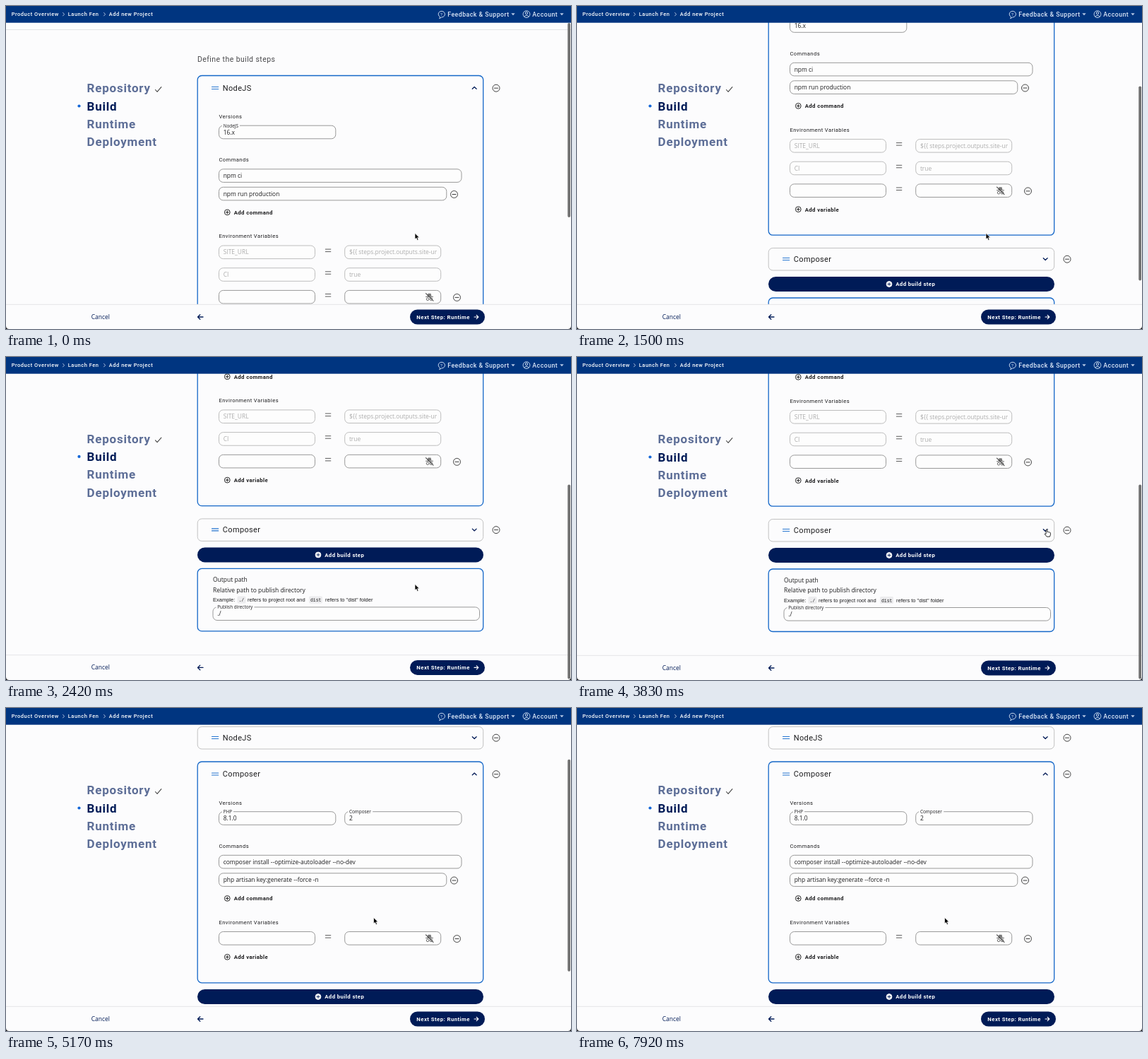
These frames come from a looping animation (800 px wide and 457 px high, 8 s). An HTML page:

```html
<!DOCTYPE html>
<html lang="en">
<head>
<meta charset="utf-8">
<title>Build steps</title>
<style>
  html, body { margin: 0; height: 100%; overflow: hidden; background: #fcfcfd; }
  svg { display: block; width: 100vw; height: 100vh; }
  text { white-space: pre; fill: #1d1d1f; }
  .ui { font-family: Roboto, sans-serif; }
  .in { font-family: "Open Sans", "Noto Sans", sans-serif; }
  .arial { font-family: "Liberation Sans", Arial, sans-serif; }
  .mono { font-family: "Liberation Mono", monospace; }
  .bold { font-weight: 700; }
  .mid { font-weight: 500; }
  .white { fill: #fff; }
  .pale { fill: #dbe6f7; }
  .navy { fill: #001b57; }
  .muted { fill: #5d6e97; }
  .dim { fill: #adadad; }
  .soft { fill: #4a4a4d; }
</style>
</head>
<body>
<svg id="stage" viewBox="0 0 800 457"></svg>
<script>
const BLUE = '#1467c8', NAVY = '#001b57', GREY = '#999', LIGHT = '#bdbdbd', DARK = '#3c3c3c';
const LOOP = 8000, SWITCH = 4080;

// Text placed by the vertical centre of its capitals.
const text = (x, y, size, str, cls, spacing = 0) =>
  `<text x="${x}" y="${y + size * .36}" font-size="${size}" class="${cls}" letter-spacing="${spacing}">${str}</text>`;
const box = (x, y, w, h, r, stroke, fill = 'none', width = 1) =>
  `<rect x="${x}" y="${y}" width="${w}" height="${h}" rx="${r}" fill="${fill}" stroke="${stroke}" stroke-width="${width}"/>`;
const line = (d, color, width = 1) =>
  `<path d="${d}" fill="none" stroke="${color}" stroke-width="${width}" stroke-linecap="round" stroke-linejoin="round"/>`;
const shape = (d, fill) => `<path d="${d}" fill="${fill}"/>`;
const circle = (x, y, r, fill, stroke = 'none', width = 1) =>
  `<circle cx="${x}" cy="${y}" r="${r}" fill="${fill}" stroke="${stroke}" stroke-width="${width}"/>`;

const minus = (x, y) => circle(x, y, 5, 'none', DARK, .95) + line(`M${x - 2.5} ${y}h5`, DARK);
const plus = (x, y, color, fill = 'none', ring = color) =>
  circle(x, y, 3.9, fill, ring, .9) + line(`M${x - 2} ${y}h4M${x} ${y - 2}v4`, color, .9);
const label = (y, str) => text(301.5, y, 7.6, str, 'ui', .42);
const addLink = (y, str) => plus(313.3, y, '#111') + text(322.7, y, 7.8, str, 'ui bold', .38);

function field(x, cy, w, value = '', cls = '', stroke = GREY) {
  return box(x, cy - 9.3, w, 18.6, 6, stroke, '#fdfdfd') + text(x + 6.2, cy, 8.45, value, 'in ' + cls);
}

function namedField(x, cy, w, name, value, nameWidth) {
  return field(x, cy, w, value) +
    `<rect x="${x + 4.5}" y="${cy - 11}" width="${nameWidth + 4}" height="4" fill="#fcfcfd"/>` +
    text(x + 6.2, cy - 9.2, 6.4, name, 'in');
}

function hiddenIcon(x, y) {
  return shape(`M${x - 3} ${y - 1}l1-4h4l1 4z`, '#777') + line(`M${x - 5} ${y - .4}h10`, '#666') +
    circle(x - 2.4, y + 3, 1.8, 'none', '#666') + circle(x + 2.4, y + 3, 1.8, 'none', '#666') +
    line(`M${x - 5} ${y - 5}l10.5 10.5`, '#444', 1.1);
}

function variable(cy, name, value) {
  const locked = !!name, stroke = locked ? LIGHT : GREY;
  return field(301.5, cy, 136, name, 'dim', stroke) +
    line(`M452.3 ${cy - 4.2}h7.5m0 3.5h-7.5`, '#555', .95) +
    `<g clip-path="url(#valueClip)">${field(479.7, cy, 136, value, 'dim', 'none')}</g>` +
    box(479.7, cy - 9.3, 136, 18.6, 6, stroke) +
    (locked ? '' : hiddenIcon(599.5, cy) + minus(638.5, cy + .7));
}

function stepHead(y, title, open, height) {
  const cy = y + (open ? 17.5 : 15.5), tip = open ? -1 : 1;
  return box(271.2, y, 404.5, height, 6, open ? BLUE : '#c2c2c2', '#fcfcfd', open ? 1.3 : 1) +
    line(`M291.5 ${cy - 1.5}h9.2m0 3h-9.2`, '#2475d0', 1.2) +
    text(306.8, cy, 11, title, 'ui', .35) +
    line(`M660.3 ${cy - tip * 1.3}l2.9 ${tip * 2.8}l2.9 ${-tip * 2.8}`, NAVY, 1.3) +
    minus(694, cy + .2);
}

function openStep(y, title, versions, commands, variables) {
  const last = y + 249.8 + 31.7 * (variables.length - 1);
  return stepHead(y, title, true, last + 63 - y) +
    label(y + 57.8, 'Versions') +
    versions.map(([name, value, w], i) => namedField(301.5 + i * 178.2, y + 80, 165.3, name, value, w)).join('') +
    label(y + 119, 'Commands') +
    field(301.5, y + 141.6, 343.5, commands[0]) +
    field(301.5, y + 167.1, 322.3, commands[1]) + minus(634.5, y + 168) +
    addLink(y + 193.4, 'Add command') +
    label(y + 227.2, 'Environment Variables') +
    variables.map(([name, value], i) => variable(y + 249.8 + 31.7 * i, name, value)).join('') +
    addLink(last + 26.5, 'Add variable');
}

function tail(y) {
  const out = y + 30;
  const code = (x, w, str) => `<rect x="${x - 2}" y="${out + 39}" width="${w}" height="10" rx="1.5" fill="#ececee"/>` +
    text(x, out + 44.3, 6.4, str, 'mono');
  return box(271, y, 405, 21, 10.5, 'none', NAVY) + plus(442, y + 10.5, NAVY, '#fff', '#fff') +
    text(451.2, y + 10.5, 7.8, 'Add build step', 'ui bold white', .4) +
    box(271.2, out, 404.5, 88.5, 6, BLUE, '#fcfcfd', 1.3) +
    text(293, out + 15.8, 8.5, 'Output path', 'in') +
    text(293, out + 30.4, 8.5, 'Relative path to publish directory', 'in') +
    text(293, out + 44.3, 7.5, 'Example:', 'arial') + code(329.5, 12, './') +
    text(342, out + 44.3, 7.5, 'refers to project root and', 'arial') + code(431, 19, 'dist') +
    text(452, out + 44.3, 7.5, 'refers to "dist" folder', 'arial') +
    namedField(293, out + 63.8, 377.5, 'Publish directory', './', 50);
}

const intro = line('M0 33.5H800', '#dedfe3', .8) + text(271, 75, 10.5, 'Define the build steps', 'ui soft', .42);
const before = intro +
  openStep(98.5, 'NodeJS', [['NodeJS', '16.x', 21]], ['npm ci', 'npm run production'],
    [['SITE_URL', '${{ steps.project.outputs.site-url }}'], ['CI', 'true'], ['', '']]) +
  stepHead(493, 'Composer', false, 31.5) + tail(533.5);
const after = intro +
  stepHead(98.5, 'NodeJS', false, 31.5) +
  openStep(148, 'Composer', [['PHP', '8.1.0', 12], ['Composer', '2', 31]],
    ['composer install --optimize-autoloader --no-dev', 'php artisan key:generate --force -n'], [['', '']]) +
  tail(470);

const side = ['Repository', 'Build', 'Runtime', 'Deployment'].map((name, i) =>
    text(114.6, 116 + 25.45 * i, 17, name, 'ui bold ' + (i === 1 ? 'navy' : 'muted'), .77)).join('') +
  line('M211.5 118.5l2.6 2.8l5.8-6.6', '#444', 1.1) + circle(103.5, 141.5, 2.1, '#1467d8');

const footer = '<rect y="422" width="800" height="40" fill="#fcfcfd"/>' + line('M0 422.3H800', '#e2e3e6', .9) +
  text(120.7, 440, 8.5, 'Cancel', 'in navy mid') +
  line('M279 440h-7.5m3.3-3.3l-3.3 3.3l3.3 3.3', NAVY, 1.3) +
  box(572, 429.5, 106, 21, 10.5, 'none', NAVY) +
  text(581.3, 440, 7.8, 'Next Step: Runtime', 'ui bold white', .43) +
  line('M663 440h5.8m-2.6-2.6l2.6 2.6l-2.6 2.6', '#fff', 1.1);

const crumb = (x, str) => text(x, 11.7, 7.5, str, 'ui mid white', .5);
const header = '<rect width="800" height="23.7" fill="#003580"/>' +
  crumb(7.8, 'Product Overview') + crumb(87.8, 'Launch Fen') + crumb(145.8, 'Add new Project') +
  line('M80.6 9.5l2 2.2l-2 2.2M138.6 9.5l2 2.2l-2 2.2', '#dbe6f7', .8) +
  line('M614.2 15.2a4.7 4.3 0 1 1 2.6.7l-2.8 1.6z', '#dbe6f7', .9) +
  text(615, 11.5, 6.2, '?', 'ui pale') +
  text(625.2, 11.7, 8.8, 'Feedback &amp; Support', 'ui mid pale', .45) + shape('M715.3 10.3h5.4l-2.7 3z', '#b9cbe8') +
  circle(737, 11.6, 4.9, 'none', '#dbe6f7', .9) + circle(737, 10, 1.7, 'none', '#dbe6f7', .9) +
  line('M733.8 14.8q3.2-3 6.4 0', '#dbe6f7', .9) +
  text(745.3, 11.7, 8.8, 'Account', 'ui mid pale', .45) + shape('M784.3 10.3h5.4l-2.7 3z', '#b9cbe8');

const stage = document.getElementById('stage');
stage.innerHTML = `<defs>
    <clipPath id="view"><rect y="23" width="800" height="399"/></clipPath>
    <clipPath id="valueClip"><rect x="480" width="130.3" height="700"/></clipPath>
  </defs>
  <rect width="800" height="457" fill="#fcfcfd"/>
  <g id="page">
    <g clip-path="url(#view)"><g id="before">${before}</g><g id="after">${after}</g></g>
    ${side}${footer}
  </g>
  ${header}
  <rect id="bar" x="795.3" width="3.8" rx="1.9" fill="#707070"/>
  ${shape('M0 452.5q0 4.5 4.5 4.5H0zM800 452.5q0 4.5-4.5 4.5h4.5z', '#111')}
  <path id="arrow" d="M0 0v8.6l2-1.8l1.4 3.1l1.6-.7l-1.4-3h2.7z" stroke="#fff" stroke-width=".7"/>
  <path id="hand" d="M-.9 3.2V-1.6q.9-1.4 1.8 0V1.6q1-.6 1.7.2q1-.5 1.6.4q1.2-.2 1.2 1.2v2.2l-1 2.6h-4.2l-3-3.6q.2-1.4 1.9-.2z"
    fill="#fff" stroke="#111" stroke-width=".9" stroke-linejoin="round"/>`;
const parts = Object.fromEntries([...stage.querySelectorAll('[id]')].map(el => [el.id, el]));

const ramp = (t, a, b) => Math.min(1, Math.max(0, (t - a) / (b - a)));
const easeOut = p => 1 - (1 - p) ** 2;
const easeInOut = p => p * p * (3 - 2 * p);
const show = (el, on) => el.setAttribute('visibility', on ? 'visible' : 'hidden');
const move = (el, x, y) => el.setAttribute('transform', `translate(${x} ${y})`);

function draw(t) {
  const switched = t >= SWITCH;
  const scroll = switched
    ? 200 - 128 * easeInOut(easeOut(ramp(t, 4731, 5170)))
    : 150.5 * easeOut(ramp(t, 60, 1000)) + 113 * easeOut(ramp(t, 1650, 2330));
  show(parts.before, !switched);
  show(parts.after, switched);
  move(parts[switched ? 'after' : 'before'], 0, -scroll);
  move(parts.page, 0, -.7 * Math.sin(Math.PI * ramp(t, 2250, 2800)));

  parts.bar.setAttribute('y', 24 + scroll * (switched ? .677 : .594));
  parts.bar.setAttribute('height', switched ? 300 : 275);
  parts.bar.setAttribute('opacity', 1 - ramp(t, 5900, 6200));

  const over = easeInOut(ramp(t, 2900, 3500)), away = easeInOut(ramp(t, 4170, 4580));
  const x = 579 + 86 * over - 144.5 * away, y = 321.5 - 75.5 * over + 50.5 * away;
  const hand = !switched && y < 261;
  show(parts.hand, hand);
  show(parts.arrow, !hand);
  move(hand ? parts.hand : parts.arrow, x, y);
}

function tick() {
  draw(performance.now() % LOOP);
  requestAnimationFrame(tick);
}
tick();
</script>
</body>
</html>
```
